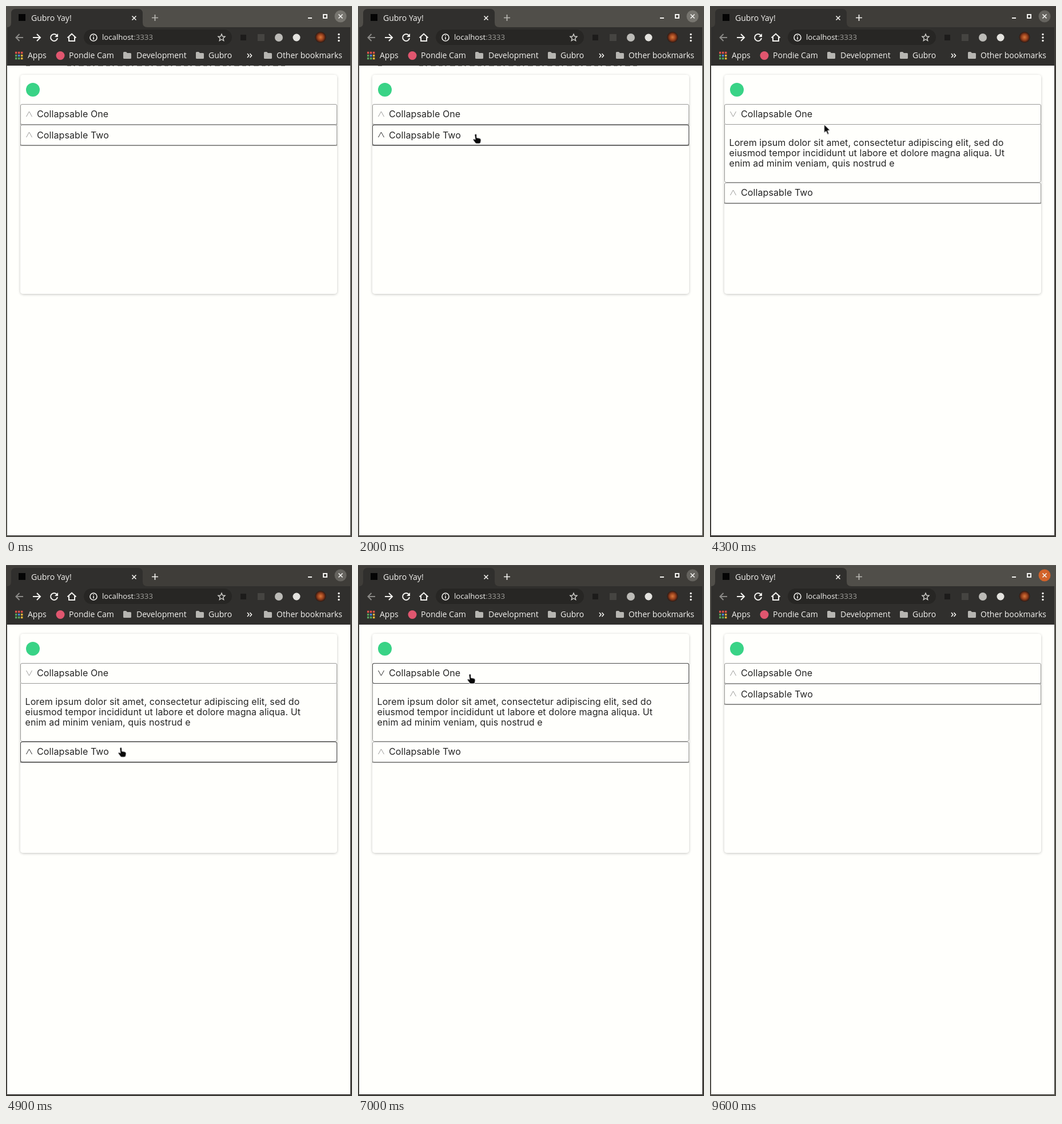
An HTML page that plays this animation: 605 by 926 pixels, repeating every 9800 ms.

```html
<!DOCTYPE html>
<html lang="en">
<head>
<meta charset="utf-8">
<title>Collapsable panels</title>
<style>
  html, body { margin: 0; width: 100%; height: 100%; overflow: hidden; background: #fffffc; }
  svg { display: block; }
  .ui { font: 14px "Open Sans", "Noto Sans", sans-serif; fill: #f4f3f0; }
  .url { font-size: 13.2px; }
  .page { font: 16px Inter, "Open Sans", sans-serif; letter-spacing: .1px; fill: #242424; }
  .line { fill: none; stroke: #f4f3f0; stroke-width: 2; }
  .fine { stroke-width: 1.6; }
  .thin { fill: none; stroke: #9a9a98; }
  .dark { fill: none; stroke: #484848; }

  /* Every track shares one 9.8 s clock and changes hard unless a key says otherwise. */
  .frame, .plus, .close, .marks, .one-open, .one-shut, .two-open, .two-shut,
  .one-hot, .two-hot, .shift, .slide, .cursor, .hand, .arrow { animation: 9.8s step-end infinite; }
  .frame { animation-name: frame; }
  .plus { animation-name: plus; }
  .close { animation-name: close; }
  .marks { animation-name: marks; }
  .one-open { animation-name: one-open; }
  .one-shut { animation-name: one-shut; }
  .two-open { animation-name: two-open; }
  .two-shut { animation-name: two-shut; }
  .one-hot { animation-name: one-hot; }
  .two-hot { animation-name: two-hot; }
  .shift { animation-name: shift; }
  .slide { animation-name: slide; }
  .cursor { animation-name: cursor; }
  .hand { animation-name: hand; }
  .arrow { animation-name: arrow; }

  @keyframes frame { 0%, 97.95% { fill: #504e49; } 30.61% { fill: #3f3d39; } }
  @keyframes plus { 0%, 97.95% { stroke: #b9b8b3; } 30.61% { stroke: #f4f3f0; } }
  @keyframes close {
    0% { fill: #77756f; } 30.61% { fill: #65635e; }
    95.91% { fill: #e5602a; } 97.95% { fill: #d2632a; }
  }
  @keyframes marks {
    0%, 15.3%, 20.4%, 27.55% { opacity: 1; }
    6.12%, 19.38%, 24.48%, 31.63% { opacity: 0; }
  }
  @keyframes one-open { 0%, 54.08%, 83.67% { opacity: 0; } 31.63%, 70.4% { opacity: 1; } }
  @keyframes one-shut { 0%, 54.08%, 83.67% { opacity: 1; } 31.63%, 70.4% { opacity: 0; } }
  @keyframes two-open { 0%, 70.4% { opacity: 0; } 54.08% { opacity: 1; } }
  @keyframes two-shut { 0%, 70.4% { opacity: 1; } 54.08% { opacity: 0; } }
  @keyframes one-hot {
    0%, 19.38%, 43.87%, 89.79% { opacity: 0; }
    13.26%, 25.51%, 67.34% { opacity: 1; }
  }
  @keyframes two-hot {
    0%, 25.51%, 54.08%, 67.34% { opacity: 0; }
    19.38%, 50%, 64.28% { opacity: 1; }
  }
  /* The second panel sits on a half pixel: its box and its label round differently. */
  @keyframes shift {
    0%, 54.08%, 83.67% { transform: translateY(0); }
    31.63%, 70.4% { transform: translateY(101px); }
  }
  @keyframes slide {
    0%, 54.08%, 83.67% { transform: translateY(0); }
    31.63%, 70.4% { transform: translateY(100px); }
  }
  @keyframes hand {
    0%, 43.87%, 54.08%, 89.79% { opacity: 0; }
    12.24%, 50%, 64.28% { opacity: 1; }
  }
  @keyframes arrow {
    0%, 12.24%, 50%, 64.28%, 97.95% { opacity: 0; }
    6.12%, 43.87%, 54.08%, 89.79% { opacity: 1; }
  }
  @keyframes cursor {
    0% { transform: translate(265px, 4px); }
    6.12% { transform: translate(265px, 4px); animation-timing-function: steps(7, start); }
    13.26% { transform: translate(210px, 157px); animation-timing-function: steps(3, start); }
    16.32% { transform: translate(204px, 192px); }
    19.38% { transform: translate(204px, 192px); animation-timing-function: steps(2, start); }
    21.42% { transform: translate(204px, 224px); }
    24.48% { transform: translate(204px, 224px); animation-timing-function: steps(4, start); }
    28.57% { transform: translate(199px, 187px); }
    43.87% { transform: translate(199px, 187px); animation-timing-function: steps(2, start); }
    45.91% { transform: translate(200px, 226px); }
    46.93% { transform: translate(200px, 226px); animation-timing-function: steps(4, start); }
    51.02% { transform: translate(199px, 319px); }
    62.24% { transform: translate(196px, 281px); }
    63.26% { transform: translate(196px, 281px); animation-timing-function: steps(5, start); }
    68.36% { transform: translate(194px, 191px); }
    89.79% { transform: translate(194px, 191px); animation-timing-function: steps(7, start); }
    96.93%, 100% { transform: translate(586px, 12px); }
  }
</style>
</head>
<body>
<svg width="605" height="926" viewBox="0 0 605 926">
  <defs>
    <radialGradient id="avatar">
      <stop offset="0" stop-color="#d9773a"/>
      <stop offset=".55" stop-color="#98401c"/>
      <stop offset="1" stop-color="#2a1712"/>
    </radialGradient>
    <filter id="shadow" x="-5%" y="-5%" width="110%" height="110%">
      <feDropShadow dx="0" dy="1" stdDeviation="2" flood-opacity=".24"/>
    </filter>
    <path id="folder" d="M0 1.500Q0 0 1.500 0H5L7 2H12.500Q14 2 14 3.500V10.500Q14 12 12.500 12H1.500Q0 12 0 10.500Z" fill="#b7b6b2"/>
    <path id="up" d="M35.500 22L40.500 13L45.500 22"/>
    <path id="down" d="M35.500 13L40.500 22L45.500 13"/>
    <rect id="head" x="25.500" y=".5" width="553" height="35" rx="2.500"/>
    <path id="frame" d="M25.500 35V133.500Q25.500 136.500 28.500 136.500H575.500Q578.500 136.500 578.500 133.500V35"/>
    <path id="base" d="M25.500 34V36.500H578.500V34"/>
  </defs>

  <!-- window -->
  <rect class="frame" width="605" height="926"/>
  <rect width="605" height="1" fill="#fff" opacity=".08"/>
  <rect x="2" y="103" width="600" height="820" fill="#fffffc"/>
  <path d="M2 104V37Q9 37 9 29V13Q9 5 17 5H231Q239 5 239 13V29Q239 37 247 37H602V104Z" fill="#302f2d"/>
  <path class="marks" d="M35 104.500H42M107 104.500H490" fill="none" stroke="#8a8a86" stroke-dasharray="7 4 3 6 9 5"/>

  <!-- tab strip -->
  <rect x="22" y="14" width="12" height="12" fill="#050505"/>
  <text class="ui" x="44" y="26">Gubro Yay!</text>
  <path class="line fine" d="M220.500 17.500L227.500 24.500M227.500 17.500L220.500 24.500"/>
  <path class="plus" d="M255 20.500H266M260.500 15V26" fill="none" stroke-width="1.700"/>
  <path class="line" d="M528 21H535M555 15H561V21H555Z"/>
  <circle class="close" cx="585" cy="18" r="10.500"/>
  <path class="line fine" d="M581.500 14.500L588.500 21.500M588.500 14.500L581.500 21.500"/>

  <!-- toolbar -->
  <rect x="136" y="41" width="259" height="27" rx="13.500" fill="#272624"/>
  <path class="line" style="stroke:#8b8a87" d="M30 55H18M23.500 49L17.500 55L23.500 61"/>
  <path class="line" d="M47 55H59M54 49L60 55L54 61"/>
  <path class="line" d="M89 51.500A6 6 0 1 0 90 56"/>
  <path d="M91 48V54H85Z" fill="#f4f3f0"/>
  <path class="line" d="M107.500 55.500L115 48.500L122.500 55.500M110 54V61H120V54"/>
  <circle class="line fine" cx="153" cy="55" r="6"/>
  <path class="line fine" d="M153 54V58.500M153 51V52.600"/>
  <text class="ui url" x="168" y="59">localhost<tspan fill="#a09f9b">:3333</tspan></text>
  <path class="line" style="stroke:#d2d1cd;stroke-width:1.400" d="M377 49L378.700 53L383 53.400L379.700 56.200L380.700 60.500L377 58.200L373.300 60.500L374.300 56.200L371 53.400L375.300 53Z"/>
  <rect x="410" y="50" width="10" height="10" fill="#1d1c1b"/>
  <rect x="440" y="49" width="12" height="12" fill="#454441"/>
  <circle cx="477" cy="55" r="7" fill="#bcbbb7"/>
  <circle cx="508" cy="55" r="6.500" fill="#e4e3df"/>
  <circle cx="550" cy="54.500" r="9.500" fill="url(#avatar)"/>
  <g fill="#f4f3f0">
    <circle cx="582" cy="49.500" r="1.700"/><circle cx="582" cy="55" r="1.700"/><circle cx="582" cy="60.500" r="1.700"/>
  </g>

  <!-- bookmarks -->
  <g stroke-width="3.400" stroke-dasharray="3.400 1.600" fill="none">
    <path stroke="#e0524a" d="M16 81.500H29.400"/>
    <path stroke="#58a55c" d="M16 86.500H19.400"/>
    <path stroke="#4a86e0" d="M21 86.500H24.400"/>
    <path stroke="#e8b63a" d="M26 86.500H29.400"/>
    <path stroke="#58a55c" d="M16 91.500H24.400"/>
    <path stroke="#e8b63a" d="M26 91.500H29.400"/>
  </g>
  <circle cx="95" cy="86.500" r="7.500" fill="#e0566f"/>
  <use href="#folder" x="205" y="80"/>
  <use href="#folder" x="332" y="80"/>
  <use href="#folder" x="451" y="80"/>
  <g class="ui">
    <text x="38" y="91">Apps</text>
    <text x="110" y="91">Pondie Cam</text>
    <text x="228" y="91">Development</text>
    <text x="354" y="91">Gubro</text>
    <text x="473" y="91">Other bookmarks</text>
  </g>
  <path class="line fine" d="M422 83L425 86.500L422 90M426.500 83L429.500 86.500L426.500 90"/>

  <!-- card -->
  <rect x="25" y="120" width="554" height="382" rx="5" fill="#fffffc" filter="url(#shadow)"/>
  <circle cx="47" cy="146" r="12" fill="#39d386"/>

  <g transform="translate(0 171)">
    <use class="thin" href="#head"/>
    <g class="one-shut">
      <use class="thin" href="#base"/>
      <use class="thin" href="#up"/>
      <g class="one-hot"><use class="dark" href="#up"/></g>
    </g>
    <g class="one-open">
      <use class="thin" href="#frame"/>
      <use class="thin" href="#down"/>
      <g class="one-hot"><use class="dark" href="#down"/></g>
      <text class="page">
        <tspan x="33.500" y="73">Lorem ipsum dolor sit amet, consectetur adipiscing elit, sed do</tspan>
        <tspan x="33.500" y="91">eiusmod tempor incididunt ut labore et dolore magna aliqua. Ut</tspan>
        <tspan x="33.500" y="109">enim ad minim veniam, quis nostrud e</tspan>
      </text>
    </g>
    <use class="dark one-hot" href="#head"/>
    <text class="page" x="54" y="23">Collapsable One</text>
  </g>

  <g transform="translate(0 207)">
    <g class="shift">
      <use class="thin" href="#head"/>
      <g class="two-shut">
        <use class="thin" style="stroke:#858583" href="#base"/>
        <use class="thin" href="#up"/>
        <g class="two-hot"><use class="dark" href="#up"/></g>
      </g>
      <g class="two-open">
        <use class="thin" href="#frame"/>
        <use class="thin" href="#down"/>
        <g class="two-hot"><use class="dark" href="#down"/></g>
        <text class="page">
          <tspan x="33.500" y="73">entore veritatis et quasi architecto beatae vitae dicta sunt explicabo.</tspan>
          <tspan x="33.500" y="91">Nemo enim ipsam voluptatem quia voluptas sit aspernatur aut odit</tspan>
          <tspan x="33.500" y="109">aut fugit, sed</tspan>
        </text>
      </g>
      <use class="dark two-hot" href="#head"/>
    </g>
    <text class="page slide" x="54" y="24">Collapsable Two</text>
  </g>

  <!-- pointer -->
  <g class="cursor" fill="#080808" stroke="#fff" stroke-linejoin="round">
    <path class="hand" transform="translate(1.500 -.5) scale(1.080)" d="M-1.500 1.500A1.700 1.700 0 0 1 2 1V5.500L7 6.500Q9 7 9 9.500L8.500 13Q8 15.500 5.500 15.500H2Q0 15.500 -1 13.500L-4 9.500Q-4.500 7.500 -2.500 7.500L-.5 8.500Z"/>
    <path class="arrow" d="M0 0V15L3.500 11.800L6 17.500L8.500 16.400L6.200 10.800H10.800Z"/>
  </g>
</svg>
</body>
</html>
```
